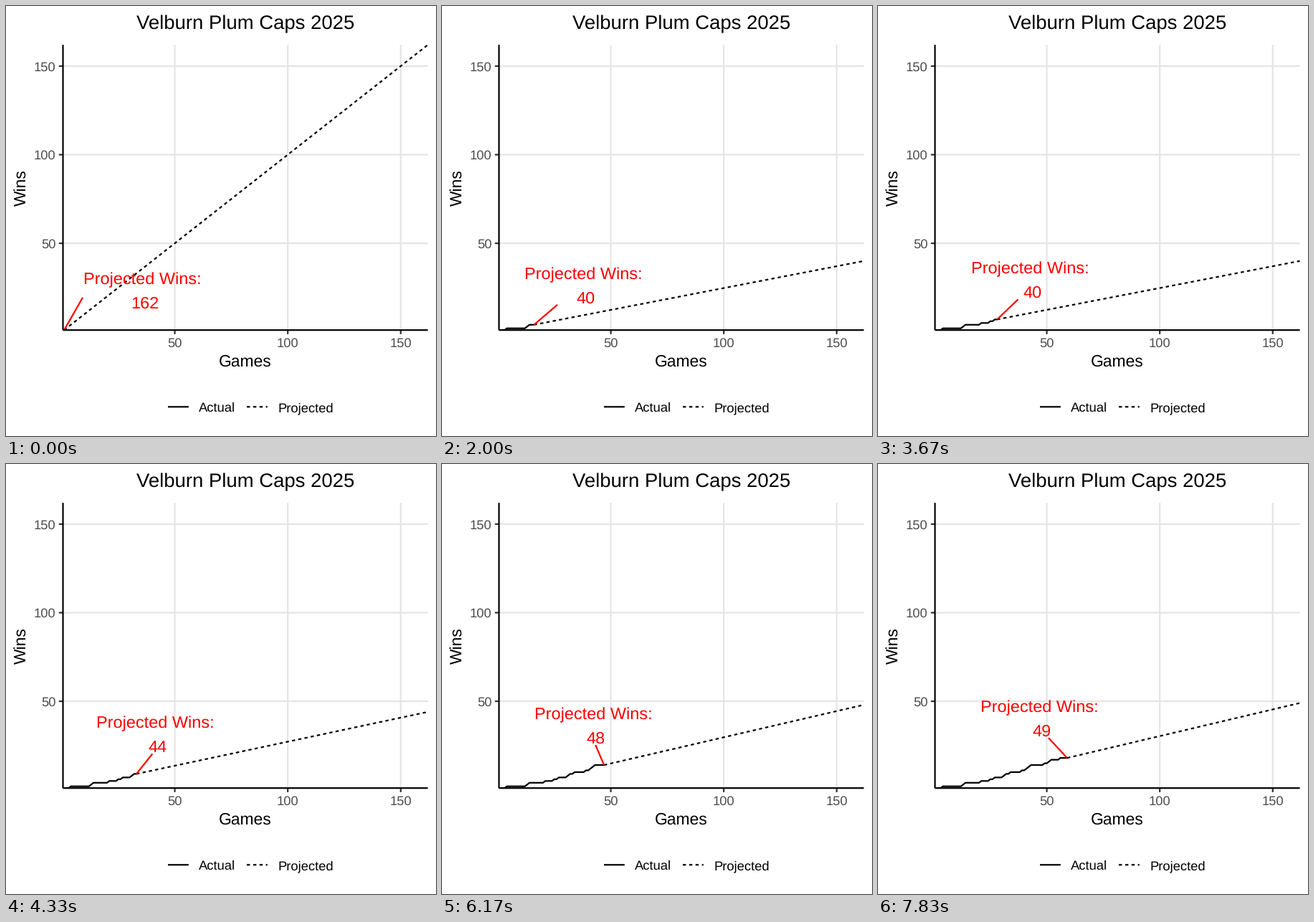
A matplotlib script that plays this animation: 600x600 px, repeating every 8000 ms.

```python
import matplotlib.pyplot as plt
import numpy as np
from matplotlib.animation import FuncAnimation
from matplotlib.patches import Rectangle

plt.rcParams["font.family"] = "Liberation Sans"
plt.rcParams["text.hinting"] = "none"

SIZE, DPI = 600, 100
LOOP_MS, TICK_MS = 8000, 20
STEPS = 48
SEASON, LAST_GAME = 162, 59
LEFT, RIGHT, TOP, BOTTOM = 79.5, 588.6, 54.2, 452.2
FIRST_X, FIRST_Y = 0.5, 1
PT = 72 / DPI
LW = 2.22 * PT
BASE = 22.9

WIN_GAMES = [1, 4, 13, 14, 21, 25, 27, 31, 32, 34, 39, 41, 42, 43, 49, 51, 52, 56]
wins = np.cumsum([g in WIN_GAMES for g in range(1, LAST_GAME + 1)])

# horizontal centre of the label over time
LABEL_STEPS = [0, 6, 9, 12, 14, 18, 21, 26, 28, 31, 35, 37, 42, 47]
LABEL_X = [190.5, 192.5, 190, 197, 205, 215, 213, 208, 195, 191, 204, 211.5, 218, 225.5]
HALF_LABEL = 80


def px(game):
    return LEFT + (np.asarray(game) - FIRST_X) * (RIGHT - LEFT) / (SEASON - FIRST_X)


def py(win):
    return BOTTOM - (np.asarray(win) - FIRST_Y) * (BOTTOM - TOP) / (SEASON - FIRST_Y)


fig = plt.figure(figsize=(SIZE / DPI, SIZE / DPI), dpi=DPI, facecolor="white")
ax = fig.add_axes([0, 0, 1, 1])
ax.set_xlim(0, SIZE)
ax.set_ylim(SIZE, 0)
ax.axis("off")
panel = Rectangle((LEFT, TOP), RIGHT - LEFT, BOTTOM - TOP, transform=ax.transData)


def line(xs, ys, color="black", z=2, dashed=False, clip=False):
    item, = ax.plot(xs, ys, color=color, lw=LW, zorder=z, snap=False,
                    ls=(0, (2, 2)) if dashed else "-",
                    solid_capstyle="butt", dash_capstyle="butt")
    if clip:
        item.set_clip_path(panel)
    return item


def text(x, y, s, size, color="black", ha="center", **kw):
    return ax.text(x, y, s, fontsize=size * PT, color=color, ha=ha,
                   va="baseline", zorder=6, **kw)


for v in (50, 100, 150):
    x, y = px(v), py(v)
    line([x, x], [TOP, BOTTOM], "#e5e5e5", 1)
    line([LEFT, RIGHT], [y, y], "#e5e5e5", 1)
    line([x, x], [BOTTOM, BOTTOM + 5.7], "#333333", 4)
    line([LEFT - 5.7, LEFT], [y, y], "#333333", 4)
    text(x, 476, str(v), BASE * 0.8, "#4d4d4d")
    text(69.5, y + 6.6, str(v), BASE * 0.8, "#4d4d4d", "right")
line([LEFT, LEFT], [TOP, BOTTOM], z=5)
line([LEFT, RIGHT], [BOTTOM, BOTTOM], z=5)

text(334, 32, "Velburn Plum Caps 2025", BASE * 1.2)
text(334, 502.5, "Games", BASE)
text(28, 253.5, "Wins", BASE, rotation=90, rotation_mode="anchor")

for x, name, dashed in ((226, "Actual", False), (336, "Projected", True)):
    line([x, x + 28.8], [559.3, 559.3], dashed=dashed)
    text(x + 43.3, 566, name, BASE * 0.8, ha="left")

actual = line([], [], clip=True)
projected = line([], [], dashed=True, clip=True)
pointer = line([], [], "red", 3, clip=True)
caption = text(0, 0, "Projected Wins:", 23.5, "red")
count = text(0, 0, "", 23.5, "red")


def pointer_start(x, y, cx):
    """Where the pointer leaves the label box on its way to (x, y)."""
    low, mid = 28, 56
    edge = cx - HALF_LABEL - 3.5
    if x < edge:
        gap = edge - x
        lift = (mid - low) * np.hypot(gap, low) / np.hypot(gap, mid)
        return edge, y - low - lift
    shift = cx + 2 - x
    return x + shift * 37 / np.hypot(shift, 37), y - low


def update(tick):
    # the small lead makes each step fall on the nearest tick
    step = int((tick * TICK_MS + 14) * STEPS / LOOP_MS)
    step = min(step, STEPS - 1)
    game = int(round(1 + step * (LAST_GAME - 1) / (STEPS - 1)))
    won = int(wins[game - 1])
    total = round(won * SEASON / game)
    x, y = float(px(game)), float(py(won))
    cx = np.interp(step, LABEL_STEPS, LABEL_X)
    sx, sy = pointer_start(x, y, cx)

    actual.set_data(px(np.arange(1, game + 1)), py(wins[:game]))
    projected.set_data([x, px(SEASON)], [y, py(total)])
    pointer.set_data([sx, x], [sy, y])
    caption.set_position((cx, y - 64))
    count.set_position((cx + 3.3, y - 30.5))
    count.set_text(str(total))
    return actual, projected, pointer, caption, count


anim = FuncAnimation(fig, update, frames=LOOP_MS // TICK_MS, interval=TICK_MS,
                     init_func=lambda: update(0), repeat=True, repeat_delay=0)
plt.show()
```
